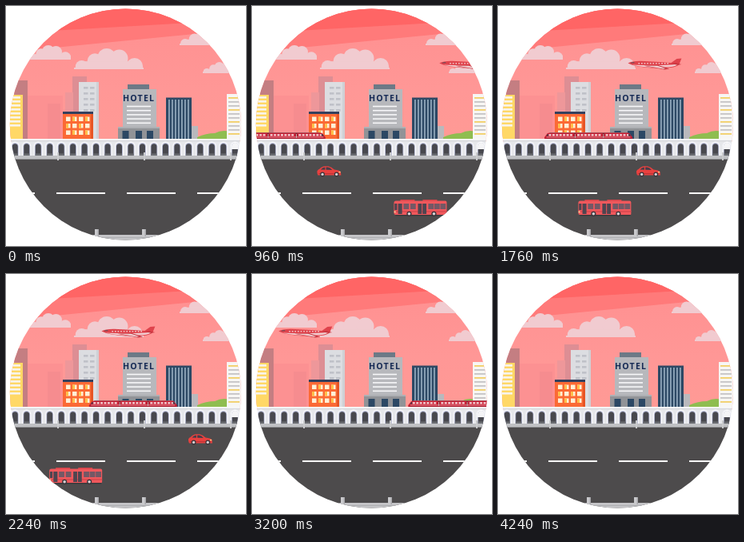
These frames come from a looping animation (300 px wide and 300 px high, 4440 ms). An HTML page with a canvas:

```html
<!DOCTYPE html>
<html lang="en">
<head>
<meta charset="utf-8">
<title>City traffic</title>
<style>
html, body { margin: 0; width: 100%; height: 100%; overflow: hidden; background: #fff; }
canvas { display: block; width: 300px; height: 300px; }
</style>
</head>
<body>
<canvas id="stage"></canvas>
<script>
const LOOP = 4440, STEP = 40;
const canvas = document.getElementById('stage');
const ratio = window.devicePixelRatio || 1;
canvas.width = canvas.height = 300 * ratio;
const c = canvas.getContext('2d');

function rect(color, x, y, w, h) {
  c.fillStyle = color;
  c.fillRect(x, y, w, h);
}

function poly(color, ...p) {
  c.fillStyle = color;
  c.beginPath();
  for (let i = 0; i < p.length; i += 2) c.lineTo(p[i], p[i + 1]);
  c.fill();
}

function disc(color, x, y, r) {
  c.fillStyle = color;
  c.beginPath();
  c.arc(x, y, r, 0, Math.PI * 2);
  c.fill();
}

function round(color, x, y, w, h, r) {
  c.fillStyle = color;
  c.beginPath();
  c.roundRect(x, y, w, h, r);
  c.fill();
}

function shape(color, path) {
  c.fillStyle = color;
  c.fill(new Path2D(path));
}

function wheel(x, y, r) {
  disc('#38343a', x, y, r);
  disc('#d6cfd2', x, y, r * 0.58);
}

function sky() {
  const g = c.createLinearGradient(0, 40, 0, 166);
  g.addColorStop(0, '#ff9292');
  g.addColorStop(0.5, '#ff9796');
  g.addColorStop(1, '#ff9a95');
  rect(g, 0, 0, 300, 170);
  poly('#ff7a7a', 0, 0, 300, 0, 300, 28, 256, 33, 20, 56, 0, 58);
  poly('#ff6565', 0, 0, 300, 0, 300, 15, 230, 21, 56, 31, 0, 24);
}

// Flat-bottomed cloud: bumps are fractions of its box
function cloud(x, y, w, h) {
  const col = '#f1cbd0';
  c.save();
  c.beginPath();
  c.rect(x, y, w, h);
  c.clip();
  for (const [fx, fy, fr] of [[0.11, 0.88, 0.3], [0.3, 0.6, 0.36], [0.47, 0.44, 0.44],
                             [0.65, 0.48, 0.42], [0.87, 0.86, 0.4]])
    disc(col, x + fx * w, y + fy * h, fr * h);
  rect(col, x + w * 0.1, y + h * 0.62, w * 0.77, h * 0.38);
  rect(col, x, y + h - 2, w, 2);
  c.restore();
}

function leftBlocks() {
  rect('#fc9192', 27, 112, 44, 54);
  rect('#f68c8f', 52, 122, 16, 44);
  rect('#c47e82', 10, 93, 17, 73);
  rect('#ffd866', 0, 111, 21, 55);
  for (let y = 113; y < 152; y += 5) rect('#f8f4ec', 4, y, 14, 2.6);

  rect('#dd8e94', 83, 88, 18, 78);
  rect('#ee979a', 74, 108, 10, 58);
  rect('#dcdde1', 91, 95, 25, 71);
  rect('#cfd0d5', 113, 95, 3, 71);
  for (let y = 101; y < 130; y += 7)
    for (const x of [97, 105]) rect('#bfc1c8', x, y, 5.5, 2.6);

  rect('#fb6a35', 71, 133, 38, 33);
  rect('#e75525', 106, 135, 3, 31);
  rect('#34405e', 71, 132, 38, 3);
  for (let r = 0; r < 3; r++)
    for (let k = 0; k < 4; k++) {
      const x = 75 + k * 8, y = 138.5 + r * 8.5;
      rect('#fff0d6', x, y, 5.5, 5.5);
      if ((r + k) % 2) rect('#ffc04b', x, y, 3, 5.5);
    }
}

function hotel() {
  rect('#6c7986', 152, 98, 27, 6);
  rect('#b7b8bc', 146, 104, 42, 48);
  c.fillStyle = '#172b55';
  c.font = 'bold 10.6px "Open Sans", "Noto Sans", sans-serif';
  c.letterSpacing = '1.2px';
  c.textBaseline = 'alphabetic';
  c.fillText('HOTEL', 146, 119.2);
  for (let i = 0; i < 5; i++) rect('#f7f7f9', 151, 124.7 + i * 5.2, 30, 1.6);
  rect('#919397', 140, 151, 52, 16);
  rect('#aeb0b4', 140, 151, 52, 2);
  for (const x of [145.5, 162, 176]) rect('#2c4864', x, 156, 8, 11);
}

function rightBlocks() {
  rect('#b9b9bd', 231, 150, 9, 17);
  rect('#2d4965', 200, 114.5, 32, 53);
  for (let x = 203; x < 231; x += 4) rect('#8ea5b8', x, 117, 1.8, 50);
  shape('#8fbd50', 'M239 164 Q250 159 261 159 Q270 154 280 157 V167 H239Z');
  rect('#f7f6f4', 276, 110, 20, 57);
  for (let i = 0; i < 10; i++)
    rect(i % 3 ? '#c6c4c5' : '#f2cf68', 278, 114 + i * 5, 14, 1.8);
}

function bridge() {
  rect('#e6e7eb', 0, 166, 300, 22);
  rect('#fafafa', 0, 166, 300, 1.5);
  rect('#cfd0d5', 0, 168.5, 300, 0.8);
  for (let i = 0; i < 20; i++) {
    const x = 11.3 + i * 14.47;
    round('#fafafc', x - 5.6, 169.5, 11.2, 18.5, [5.6, 5.6, 0, 0]);
    round('#b9bdd6', x - 4.4, 171, 8.8, 17, [4.4, 4.4, 0, 0]);
    round('#48484e', x - 3.5, 172.2, 7, 15.8, [3.5, 3.5, 0, 0]);
    rect('#6a6c71', x - 3.5, 184.5, 7, 3.5);
  }
  // Daylight behind the last arch
  round('#f4f4f6', 282, 171, 8.6, 8, [4.3, 4.3, 0, 0]);
}

function road() {
  rect('#4d4b4c', 0, 188, 300, 112);
  rect('#bfc0c3', 0, 187, 300, 4.5);
  rect('#8f9093', 0, 191, 300, 1);
  for (let x = 65; x < 300; x += 108) rect('#c9cacc', x - 1, 183, 2, 10);
  for (let x = -25; x < 300; x += 88) rect('#fafafa', x, 233, 61, 2);
}

function curb() {
  rect('#c4c4c7', 0, 286, 300, 9);
  rect('#adaeb1', 0, 289, 300, 1);
  for (const x of [111, 170]) {
    rect('#c9c9cc', x, 279, 5, 9);
    rect('#a8a8ab', x + 3.5, 279, 1.5, 9);
  }
}

function train(x) {
  c.save();
  c.translate(x, 158);
  shape('#c91f34', 'M-.5 8 V6 L3 1.5 Q4 .5 6 .5 H103 Q105 .5 106 1.5 L109.5 6 V8Z');
  rect('#a8505a', 6, 0, 97, 1);
  for (let k = 0; k < 3; k++) {
    const left = 5 + k * 35.5;
    for (let i = 0; i < 7; i++) rect('#f3d9dc', left + i * 4.4, 2.2, 3, 2.2);
    if (k < 2) {
      rect('#861d2b', left + 31.6, 1, 2.4, 7);
      rect('#e9c5ca', left + 32.4, 2, 0.8, 5);
    }
  }
  rect('#efc2c7', 2, 5.6, 105, 0.7);
  rect('#a3172b', 0, 7, 109, 1);
  poly('#413b49', 104.5, 2, 105.5, 2, 107.6, 4.6, 104.5, 4.6);
  poly('#413b49', 4.2, 2, 3.5, 2, 1.7, 4.6, 4.2, 4.6);
  c.restore();
}

function plane(x) {
  c.save();
  c.translate(x, 65.5);
  shape('#df434c', 'M0 6 Q5 3 16 3.2 L40 4.6 L54 5.4 L61 .5 L67 0 L64 7.5 Q61 10.5 53 11.6 L30 12 Q8 10.4 0 6Z');
  shape('#f1ced1', 'M5 8 Q20 9 42 8.6 Q56 8 63 7 Q60 10 52 10.8 L30 11.2 Q13 10.4 5 8Z');
  for (let i = 0; i < 11; i++) rect('#f7dadc', 13 + i * 3.6, 5.6, 1.6, 1.3);
  poly('#c8353f', 20, 9.2, 38, 8.6, 52, 13, 46, 14);
  poly('#f0cfd1', 24, 9.6, 37, 9.2, 47, 12.4, 44, 12.9);
  poly('#c8353f', 53, 6.4, 60, 5.8, 67, 7.6, 62, 8.2);
  poly('#6b4b58', 4, 5, 8, 4.6, 8, 5.8, 3.4, 6);
  c.restore();
}

function car(x) {
  c.save();
  c.translate(x, 200);
  shape('#e8413f', 'M0 6.5 Q1 4.2 3 3.8 Q6 .3 10 .2 H14 Q18 .8 21.5 4.6 Q28 5.2 29.5 7.5 L30 11.4 H1 Q0 10 0 6.5Z');
  shape('#453e49', 'M4.5 4.6 Q7 1.5 10 1.4 V4.8Z');
  shape('#453e49', 'M11.2 1.4 H13.5 Q16.5 1.8 19 5 L11.2 4.8Z');
  rect('#b93236', 2, 9, 26, 0.9);
  rect('#ffd98a', 27.2, 6.9, 2, 1.4);
  wheel(6.7, 10.4, 2.9);
  wheel(24.3, 10.4, 2.9);
  c.restore();
}

function bus(x) {
  const glass = '#735865', dark = '#4e4550';
  c.save();
  c.translate(x, 242);
  rect('#39373a', 2, 19, 63, 1.4);
  rect('#d3444a', 8, 0, 18, 3);
  rect('#d3444a', 36, 0, 18, 3);
  round('#f0585c', 0, 1.6, 66, 17.4, [2.5, 2, 1, 2]);
  rect('#d94a50', 1, 14, 65, 1.6);
  rect(dark, 0.8, 5, 3.2, 8);
  rect(dark, 5.2, 5, 5, 13);
  for (const left of [12, 20.5, 43, 50.5, 58]) rect(glass, left, 5, 6.8, 7);
  rect(dark, 30, 5, 4.8, 13);
  rect(dark, 35.8, 5, 4.8, 13);
  rect('#ffe0a0', 0.3, 14.5, 1.8, 1.8);
  wheel(19, 17.8, 3.1);
  wheel(50, 17.8, 3.1);
  c.restore();
}

function draw(t) {
  c.setTransform(ratio, 0, 0, ratio, 0, 0);
  rect('#fff', 0, 0, 300, 300);
  c.save();
  c.beginPath();
  c.arc(149.4, 148, 144.6, 0, Math.PI * 2);
  c.clip();
  sky();
  cloud(28, 49, 53, 18);
  cloud(85, 53, 87, 26);
  cloud(217, 30, 62, 19);
  cloud(246, 70, 44, 14);
  const d = t - 1280;
  plane(205.5 - 0.0897 * d);
  leftBlocks();
  hotel();
  rightBlocks();
  train(12.8 + 0.0953 * d);
  bridge();
  road();
  car(118 + 0.1145 * d);
  bus(146.6 - 0.0963 * d);
  curb();
  c.restore();
}

function tick(now) {
  const t = Math.floor((now % LOOP) / STEP) * STEP;
  draw(t < 80 ? 0 : Math.min(t, 4240));
  requestAnimationFrame(tick);
}

draw(0);
requestAnimationFrame(tick);
</script>
</body>
</html>
```
